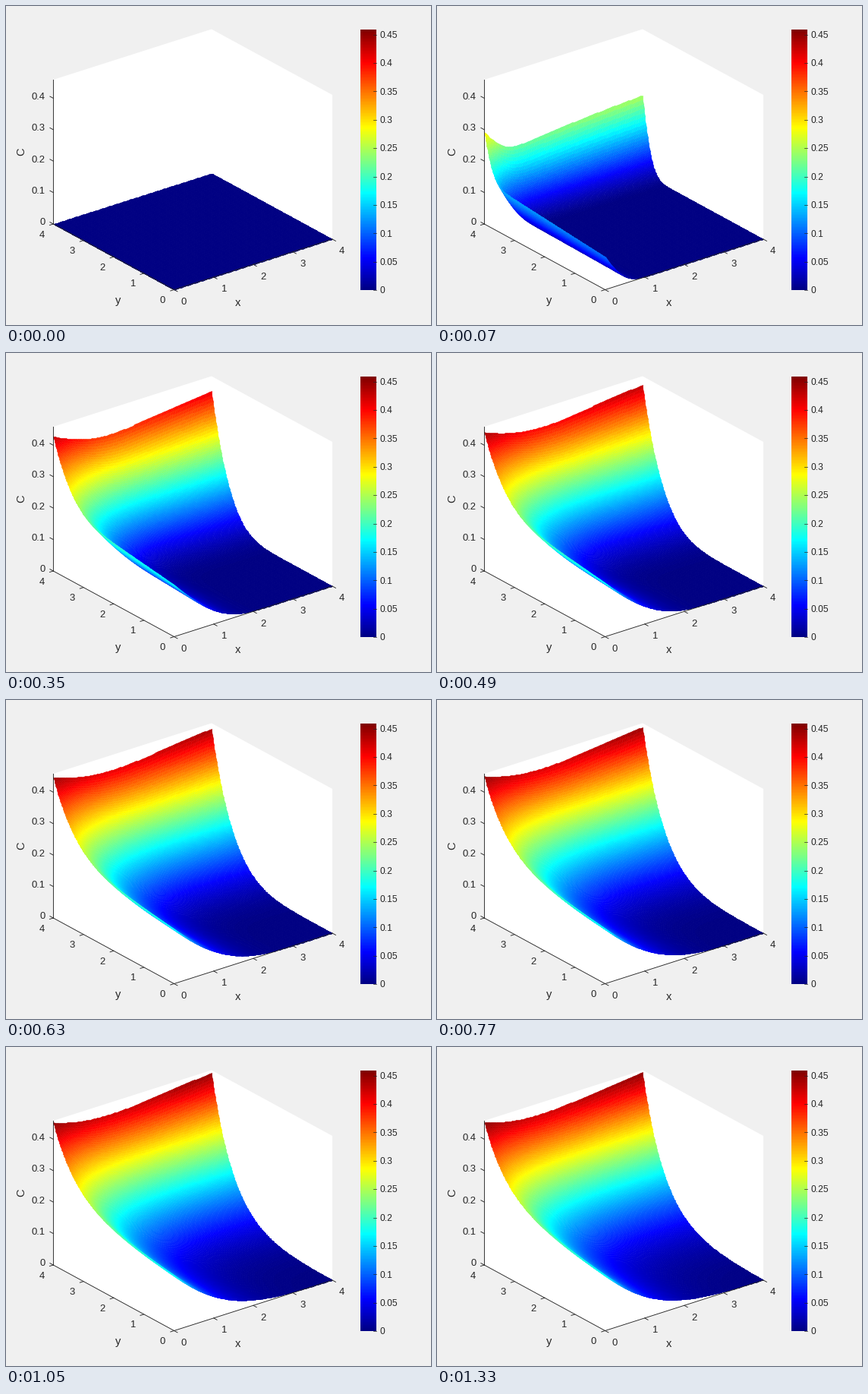
Recreate the animation shown at these times as a matplotlib script. Size 560 px wide and 420 px high, loop 1400 ms.

```python
import math

import matplotlib.pyplot as plt
import numpy as np
from matplotlib.animation import FuncAnimation
from matplotlib.colors import ListedColormap

W, H, DPI = 560, 420, 100
FRAMES, INTERVAL = 20, 70
SIZE, Z_MAX = 4, 0.459
INK = "#262626"
PX = 72 / DPI  # points per pixel

# Stage position of the axes origin and of one unit along each axis.
ORIGIN = np.array([221.5, 373.5])
EX = np.array([208.5, -66.5]) / SIZE
EY = np.array([-159.2, -86.5]) / SIZE
EZ = np.array([0, -190.0]) / Z_MAX

level = np.arange(1, 257) / 256
jet = ListedColormap(
    np.clip([1.5 - np.abs(4 * level - c) for c in (3, 2, 1)], 0, 1).T)
erfc = np.vectorize(math.erfc)

plt.rcParams["font.family"] = "Liberation Sans"
fig = plt.figure(figsize=(W / DPI, H / DPI), dpi=DPI, facecolor="#f0f0f0")
ax = fig.add_axes([0, 0, 1, 1])
ax.set_xlim(0, W)
ax.set_ylim(H, 0)
ax.axis("off")


def project(x, y, z=0.0):
    return [ORIGIN[i] + x * EX[i] + y * EY[i] + z * EZ[i] for i in (0, 1)]


def line(p, q, width=0.9):
    ax.plot([p[0], q[0]], [p[1], q[1]], color=INK, lw=width * PX, zorder=5)


def tick(p, along):
    line(p, p - 5 * along / np.hypot(*along))


def label(x, y, text, size=13, ha="center"):
    """Place text with its digits centred on height y."""
    ax.text(x, y + 0.358 * size, text, size=size * PX, color=INK,
            ha=ha, va="baseline", zorder=6)


def draw_box():
    corners = [(0, 4, Z_MAX), (4, 4, Z_MAX), (4, 0, Z_MAX),
               (4, 0, 0), (0, 0, 0), (0, 4, 0)]
    ax.fill(*zip(*[project(*c) for c in corners]), color="white", lw=0, zorder=1)
    line(project(0, 0), project(4, 0))
    line(project(0, 0), project(0, 4))
    line(project(0, 4), project(0, 4, Z_MAX))
    for i in range(SIZE + 1):
        px, py = np.array(project(i, 0)), np.array(project(0, i))
        tick(px, EY)
        tick(py, EX)
        label(px[0] + 12.8, px[1] + 14.6, str(i))
        label(py[0] - 15, py[1] + 12.9, str(i))
        pz = np.array(project(0, 4, i / 10))
        tick(pz, -EY)
        label(51.6, pz[1] - 3.3, f"{i / 10:g}", ha="right")
    label(306, 390, "x", 14.67)
    label(147.5, 386.5, "y", 14.67)
    ax.text(19.8, 192, "C", size=14.67 * PX, color=INK, rotation=90,
            ha="center", va="center", zorder=6)


def draw_colorbar():
    left, right, top, bottom = 467, 488, 31, 374
    ax.pcolormesh([left, right], np.linspace(bottom, top, 257),
                  np.arange(256)[:, None], cmap=jet, zorder=2)
    for i in range(10):
        value = i / 20
        y = bottom - (bottom - top) * value / Z_MAX
        line((right - 4, y), (right, y), 0.7)
        label(492.6, y, f"{value:g}", 12, "left")


def front(dist, tau, reach, drift):
    """Advection, diffusion and decay away from a feeding wall."""
    if tau == 0:
        return np.zeros_like(dist)
    s = math.sqrt(tau)
    u = dist / (reach * (1 - drift))
    return 0.5 * np.exp(drift * u) * (
        np.exp(-u) * erfc(u / (2 * s) - s) - np.exp(u) * erfc(u / (2 * s) + s))


# Far cells come first so that near ones cover them.
xs = np.linspace(SIZE, 0, 91)
ys = np.linspace(SIZE, 0, 261)
X, Y = np.meshgrid(xs, ys)
back_wall = 0.365 + 0.033 * X - 0.0028 * X ** 2
side_wall = 0.175 * (1 + 0.085 * Y)
mesh = None


def update(n):
    global mesh
    if mesh is not None:
        mesh.remove()
    back = back_wall * front(SIZE - ys, 0.285 * n, 0.72, 0.48)[:, None]
    side = side_wall * front(xs * (1 + 0.25 * xs), 0.35 * n, 1.35, 0.6)
    c = back + side * (1 - 1.7 * back)
    cells = (c[1:, 1:] + c[:-1, 1:] + c[1:, :-1] + c[:-1, :-1]) / 4
    mesh = ax.pcolormesh(*project(X, Y, c), cells, cmap=jet, vmin=0, vmax=Z_MAX,
                         shading="flat", antialiased=True, edgecolors="face",
                         linewidth=0.5 * PX, zorder=3)
    ax.set_xlim(0, W)
    ax.set_ylim(H, 0)
    return [mesh]


draw_box()
draw_colorbar()
anim = FuncAnimation(fig, update, frames=FRAMES, interval=INTERVAL,
                     repeat=True, repeat_delay=0, blit=False)
plt.show()
```
